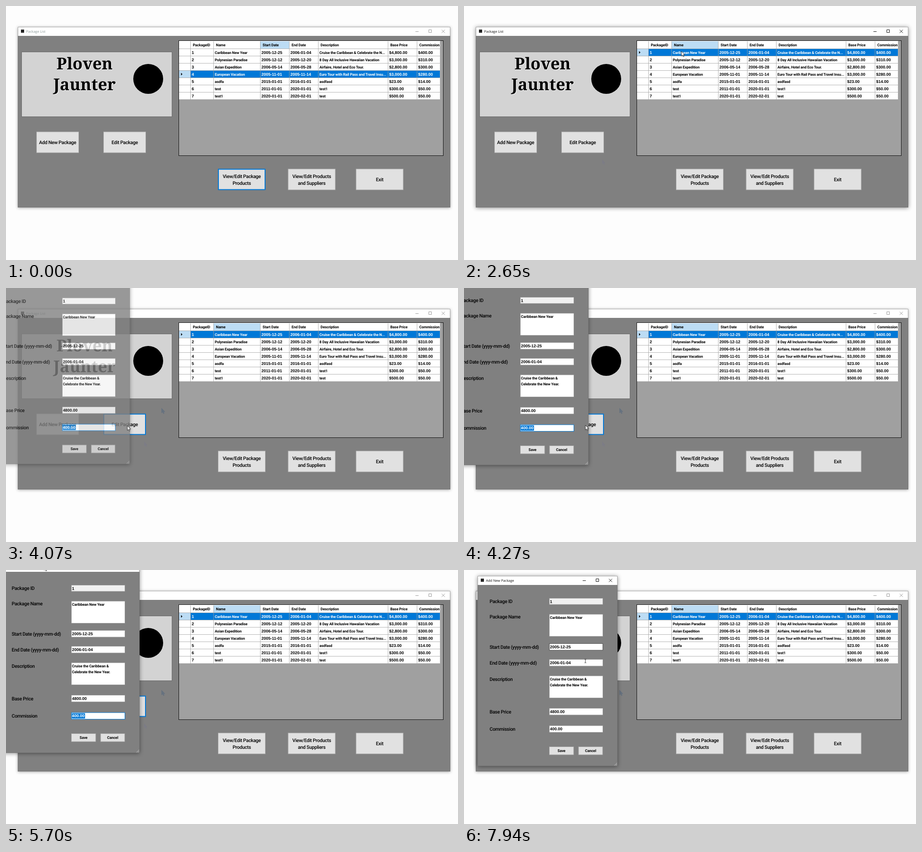
Write an HTML page that moves like this. It is 998 by 561 pixels and loops after 8 s.

```html
<!DOCTYPE html>
<html lang="en">
<head>
<meta charset="utf-8">
<title>Package List</title>
<style>
  html, body { margin: 0; width: 100%; height: 100%; overflow: hidden; background: #fdfdfd; }
  svg { display: block; width: 100%; height: 100%; }
  text { white-space: pre; text-rendering: geometricPrecision; }
  .cell { font: 700 8.2px Roboto, sans-serif; letter-spacing: -.15px; }
  .num { font: 700 9px "Liberation Sans", Arial, sans-serif; }
  .label { font: 500 10.7px Roboto, sans-serif; letter-spacing: -.35px; }
  .title { font: 400 7.5px "Open Sans", sans-serif; }
  .brand { font: 900 36px "Noto Serif", serif; }
</style>
</head>
<body>
<svg id="stage" viewBox="0 0 998 561"></svg>
<script>
const LOOP = 8000, BLUE = '#0078d7', PALE = '#bcdcf4', GREY = '#808080';
const stage = document.getElementById('stage');

// Pointer path: time, x, y. The picture holds between steps.
const path = [
  [0, -50, -50], [200, 988, 550], [400, 860, 520], [600, 700, 470], [810, 540, 425],
  [1010, 400, 380], [1210, 304, 337], [1430, 302, 316], [1630, 301, 303],
  [2030, 352, 235], [2230, 430, 150], [2430, 480, 100], [2630, 480, 100],
  [2850, 478, 102], [3050, 430, 150], [3250, 344, 265], [3450, 292, 281],
  [3670, 275, 298], [3870, 268, 304], [4070, 268, 304], [4270, 268, 303],
  [4470, 250, 262], [4680, 200, 140], [4890, 124, 4], [5100, 64, -23],
  [5700, 84, -10], [5900, 114, 10], [6130, 128, 19], [6330, 150, 45],
  [6530, 190, 75], [6720, 228, 104], [6920, 250, 135], [7120, 262, 165],
  [7330, 266, 171], [7530, 267, 177], [7740, 268, 190], [7940, 268, 201]
];

const escapeText = s => s.replace(/&/g, '&amp;');
const rect = (x, y, w, h, fill, extra = '') =>
  `<rect x="${x}" y="${y}" width="${w}" height="${h}" fill="${fill}" ${extra}/>`;
const framed = (x, y, w, h, fill, line, width = 1) =>
  rect(x + width / 2, y + width / 2, w - width, h - width, fill, `stroke="${line}" stroke-width="${width}"`);
const text = (x, y, s, cls, fill = '#000', anchor = 'start') =>
  `<text x="${x}" y="${y}" class="${cls}" fill="${fill}" text-anchor="${anchor}">${escapeText(s)}</text>`;
const value = (x, y, s, fill) => text(x, y, s, /^[$\d.,-]+$/.test(s) ? 'num' : 'cell', fill);
const line = (d, color, width = 1) => `<path d="${d}" fill="none" stroke="${color}" stroke-width="${width}"/>`;

function button(x, y, w, h, lines, look = 'plain', cls = 'label') {
  const [fill, edge, width] = {
    plain: ['#e1e1e1', '#adadad', 1], focus: ['#e1e1e1', BLUE, 2],
    hover: ['#e5f1fb', BLUE, 1], press: ['#cce4f7', BLUE, 1]
  }[look];
  const base = y + h / 2 + (cls === 'label' ? 4 : 3) - (lines.length - 1) * 7.5;
  return framed(x, y, w, h, fill, edge, width) +
    lines.map((s, i) => text(x + w / 2, base + i * 15, s, cls, '#000', 'middle')).join('');
}

function windowFrame(x, y, w, h, title, active) {
  const ink = active ? '#111' : '#9a9a9a', mid = y + 10, right = x + w;
  const shadow = `style="filter:drop-shadow(0 1px ${active ? 5 : 3}px rgba(0,0,0,${active ? .45 : .35}))"`;
  return rect(x, y, w, h, GREY, shadow) + rect(x, y, w, 20, '#fff') +
    rect(x + .5, y + .5, w - 1, h - 1, 'none', 'stroke="#707070" stroke-opacity=".6"') +
    rect(x + 7, mid - 4, 7, 7, '#222') +
    text(x + 18.5, mid + 2.8, title, 'title', active ? '#111' : '#8b9999') +
    line(`M${right - 77} ${mid + .5}h7`, ink) +
    line(`M${right - 47.5} ${mid - 3.5}h6v6h-6z`, ink) +
    line(`M${right - 19} ${mid - 3.5}l7 7m0-7l-7 7`, ink);
}

const edges = [382, 407, 458, 561, 625, 689, 843, 907, 958];
const headers = ['PackageID', 'Name', 'Start Date', 'End Date', 'Description', 'Base Price', 'Commission'];
const rows = [
  'Caribbean New Year|2005-12-25|2006-01-04|Cruise the Caribbean & Celebrate the N...|$4,800.00|$400.00',
  'Polynesian Paradise|2005-12-12|2005-12-20|8 Day All Inclusive Hawaiian Vacation|$3,000.00|$310.00',
  'Asian Expedition|2006-05-14|2006-05-28|Airfaire, Hotel and Eco Tour.|$2,800.00|$300.00',
  'European Vacation|2005-11-01|2005-11-14|Euro Tour with Rail Pass and Travel Insu...|$3,000.00|$280.00',
  'asdfa|2015-01-01|2016-01-01|asdfasd|$23.00|$14.00',
  'test|2011-01-01|2020-01-01|test1|$300.00|$50.00',
  'test1|2020-01-01|2020-02-01|test|$500.00|$50.00'
].map((s, i) => [String(i + 1), ...s.split('|')]);

function grid(row, column) {
  const top = 94.5 + row * 16;
  let out = framed(381, 76, 585, 255, '#a0a0a0', '#111') + rect(382, 77, 577, 130, '#fff') +
    rect(edges[column], 78, edges[column + 1] - edges[column], 16, PALE) +
    rect(382, top, 25, 16, PALE) + rect(407, top, 551, 16, BLUE) +
    `<path d="M386.500 ${top + 5}l3 3-3 3z"/>`;
  for (let i = 0; i <= 7; i++) out += line(`M382 ${94.5 + i * 16}H958`, '#a0a0a0', .8);
  edges.slice(1).forEach(x => {
    out += line(`M${x + .5} 78V207`, '#a0a0a0', .8);
  });
  headers.forEach((s, i) => { out += text(edges[i + 1] + 5.5, 89, s, 'cell'); });
  rows.forEach((cells, r) => cells.forEach((s, c) => {
    out += value(edges[c + 1] + 3, 105.7 + r * 16, s, r === row ? '#fff' : '#000');
  }));
  return out;
}

function brandPanel() {
  const name = (dx, fill) => text(173.5 + dx, 140 + dx, 'Ploven', 'brand', fill, 'middle') +
    text(173.5 + dx, 186 + dx, 'Jaunter', 'brand', fill, 'middle');
  return framed(34, 101, 333, 144, '#d3d3d3', '#696969') + name(1.2, '#f4f4f4') + name(0, '#000') +
    '<circle cx="314" cy="161" r="33"/>';
}

function mainWindow(t) {
  const chosen = t >= 2630;
  const over = (t >= 1430 && t < 2030) || (t >= 3450 && t < 3870);
  const edit = t >= 4070 ? 'focus' : t >= 3870 ? 'press' : over ? 'hover' : 'plain';
  return windowFrame(26, 46, 955, 399, 'Package List', chosen && t < 4070) + brandPanel() +
    grid(chosen ? 0 : 3, chosen ? 2 : 3) +
    button(67, 277.5, 94, 47, ['Add New Package']) +
    button(215, 277.5, 94, 47, ['Edit Package'], edit) +
    button(468, 359.5, 105, 47, ['View/Edit Package', 'Products'], chosen ? 'plain' : 'focus') +
    button(622.5, 359.5, 105, 47, ['View/Edit Products', 'and Suppliers']) +
    button(772.5, 359.5, 105, 47, ['Exit']);
}

// label, label baseline, box top, box height, lines of text
const fields = [
  ['Package ID', 73, 62, 14.5, ['1']],
  ['Package Name', 107, 97.5, 49.5, ['Caribbean New Year']],
  ['Start Date (yyyy-mm-dd)', 173.5, 162, 15.5, ['2005-12-25']],
  ['End Date (yyyy-mm-dd)', 208.5, 197, 15.5, ['2006-01-04']],
  ['Description', 245, 233.5, 49.5, ['Cruise the Caribbean &', 'Celebrate the New Year.']],
  ['Base Price', 317, 305, 15.5, ['4800.00']],
  ['Commission', 355, 343.5, 15.5, ['400.00']]
];

function dialog(t) {
  if (t < 4070) return '';
  const [dx, dy] = t < 5700 ? [-64, -42] : t < 5900 ? [-44, -29] : t < 6130 ? [-14, -9] : [0, 0];
  const opening = t < 4270;
  const zoom = opening ? 'translate(184.5 223) scale(.99) translate(-184.5 -223)' : '';
  const selected = t < 7330;
  let out = windowFrame(30, 13, 309, 420, 'Add New Package', true);
  fields.forEach(([label, base, top, h, lines], i) => {
    const marked = i === 6 && selected;
    const edge = marked ? BLUE : i === 2 && t >= 7120 ? '#333' : '#9a9a9a';
    out += text(56.5, base, label, 'label') +
      framed(188, top, 119, h, i ? '#fff' : '#f0f0f0', edge, marked ? 1 : .8);
    if (marked) out += rect(189.5, top + 2, 29, 11.5, BLUE);
    lines.forEach((s, n) => {
      out += value(189.7, top + 10.8 + n * 13, s, marked ? '#fff' : '#000');
    });
  });
  out += button(188, 390, 54.5, 18.5, ['Save'], 'plain', 'cell') +
    button(252.500, 390, 54, 18.5, ['Cancel'], 'plain', 'cell') +
    line('M332 432l6-6M335 432l3-3', '#c8c8c8', .9);
  return `<g transform="translate(${dx} ${dy}) ${zoom}" opacity="${opening ? .8 : 1}">${out}</g>`;
}

const arrow = (x, y, fill, stroke) =>
  `<path transform="translate(${x} ${y})" d="M0 0V10.500l2.400-2.200 1.700 3.800 1.700-.7-1.700-3.700H7.300z"
    fill="${fill}" stroke="${stroke}" stroke-width=".8"/>`;

function pointer(t, x, y) {
  if (t >= 5100 && t < 5700) return '';
  return t < 6720 ? arrow(x, y, '#fff', '#111')
    : line(`M${x - 2} ${y - 4}h1.500l.5.5.5-.5h1.500M${x} ${y - 3.5}v7M${x - 2} ${y + 4}h1.500l.5-.5.5.5h1.500`, '#222', .9);
}

const trails = t => (t >= 1430 ? arrow(305, 339, '#7c7c86', 'none') : '') +
  (t >= 3450 ? arrow(343.5, 265.5, '#66727f', '#66727f') : '');

let shown = -1;
function draw(now) {
  const t = now % LOOP;
  const step = path.findLastIndex(p => p[0] <= t);
  if (step !== shown) {
    shown = step;
    const [time, x, y] = path[step];
    stage.innerHTML = mainWindow(time) + trails(time) + dialog(time) + pointer(time, x, y);
  }
  requestAnimationFrame(() => draw(performance.now() - start));
}
const start = performance.now();
draw(0);
</script>
</body>
</html>
```
